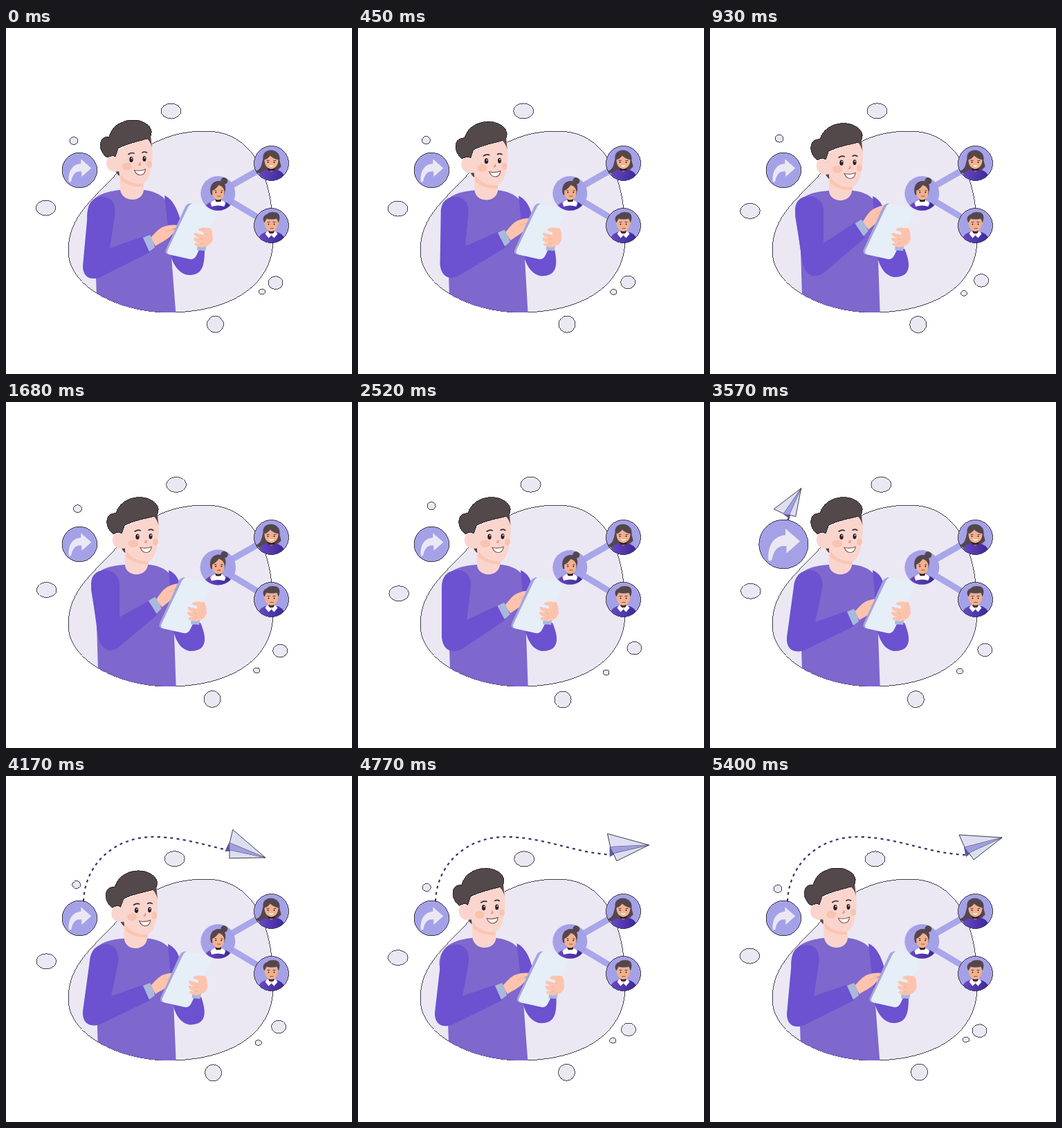
An HTML page for the animation above (5.46 s loop, 500x500 px).

```html
<!DOCTYPE html>
<html lang="en">
<head>
<meta charset="utf-8">
<title>Sharing with friends</title>
<style>
  html, body { margin: 0; width: 100%; height: 100%; overflow: hidden; background: #fff; }
  svg { display: block; width: 100vw; height: 100vh; }
  .edge { stroke: #17151d; stroke-width: .8; vector-effect: non-scaling-stroke; shape-rendering: crispEdges; }
  .pale { fill: #ebe8f4; }
  .disc { fill: #a5a1e7; }
  .sleeve { fill: #6c51d0; }
  .shirt { fill: #7e67cd; }
  .face { fill: #fad5cd; }
  .hand { fill: #fdc3ad; }
  .cuff { fill: #a9b9dc; }
  .hair { fill: #53484a; }
  .ink { fill: #2b2026; }
  .tan { fill: #f1b18f; }
  .brown { fill: #55464c; }
</style>
</head>
<body>
<svg viewBox="0 0 500 500">
  <defs>
    <path id="blob" d="M288 149 C354 149 387 208 386 305 C386 375 320 411 235 411 C165 411 90 375 90 322 C90 270 130 245 160 210 C195 170 235 149 288 149 Z"/>
    <clipPath id="body"><use href="#blob"/><path d="M60 100 H300 V325 H60 Z"/></clipPath>
    <clipPath id="round"><circle r="24.8"/></clipPath>
    <linearGradient id="coat"><stop stop-color="#6a49c4"/><stop offset="1" stop-color="#3b2796"/></linearGradient>
    <mask id="flown" maskUnits="userSpaceOnUse" x="0" y="0" width="500" height="300">
      <path id="reveal" fill="none" stroke="#fff" stroke-width="12"/>
    </mask>
  </defs>

  <use href="#blob" class="pale edge"/>
  <g id="bubbles" class="pale edge"></g>

  <g id="man">
    <g clip-path="url(#body)">
      <path id="torso" class="shirt"/>
      <path id="farArm" class="sleeve"/>
    </g>
    <path id="neck" class="face"/>
    <g id="head">
      <path class="hair" d="M156 200 L163 203 L164 214 Q158 210 156 200 Z"/>
      <path class="face" d="M158 178 L209 152 C212 170 213 188 210 202 C207 218 202 226 193 226 C180 226 168 219 163 207 C152 210 144 203 145 194 C146 186 152 183 158 187 Z"/>
      <path d="M165 211 C174 222 184 226 198 225 L198 229 C184 231 172 225 166 220 Z" fill="#fcc5ae"/>
      <path class="hair edge" d="M146 187 C137 181 134 170 138 162 C141 158 145 157 149 157 C153 142 167 133 184 133 C200 133 211 143 210 151 C210 157 207 160 204 160 C190 164 175 167 162 174 L158 186 C154 183 150 185 146 187 Z"/>
      <path d="M204 160 L209 156 L211 173 Q209 165 204 160 Z" class="hair"/>
      <ellipse cx="175" cy="200" rx="7" ry="5.6" fill="#f9c3ae"/>
      <ellipse cx="207" cy="197" rx="4" ry="5" fill="#f9c3ae"/>
      <ellipse cx="181" cy="190" rx="2.700" ry="4" class="ink"/>
      <ellipse cx="200" cy="189" rx="2.500" ry="3.900" class="ink"/>
      <circle cx="181.700" cy="188.500" r=".9" fill="#fff"/>
      <circle cx="200.500" cy="187.500" r=".9" fill="#fff"/>
      <path d="M177 182.500 Q181 179.500 185 181 M197 180 Q200 178 203.500 180" fill="none" stroke="#3a2d33" stroke-width="1.700" stroke-linecap="round"/>
      <path d="M193.500 195 Q195 197.500 192 198" fill="none" stroke="#e0937e" stroke-width="1.800" stroke-linecap="round"/>
      <path d="M185.500 205.500 Q194 207.500 201.500 204 Q201 212.500 193.500 212.500 Q188 212 185.500 205.500 Z" fill="#fff" stroke="#8a5a52" stroke-width="1.200"/>
    </g>
    <path id="nearArm" class="sleeve"/>
    <g id="nearHand">
      <path class="hand" d="M3 -9 C9 -15 14 -22 22 -25 C30 -28 38 -28 43 -27 C44 -24 40 -23 34 -21 L43 -22 C44 -18 38 -17 34 -14 C29 -7 21 -4 10 3 Z"/>
      <path d="M24 -17 Q31 -21 37 -20" fill="none" stroke="#f2a68f" stroke-width=".8"/>
      <path class="cuff" d="M-8 -9 L2 -13 Q7 -5 9 5 L1 11 Z"/>
    </g>
    <g id="phone">
      <path d="M267 253.500 L302 262 L268 334 L234 327 Q229 326 231 320 L259 258 Q262 253 267 253.500 Z" fill="#a5a5db"/>
      <path d="M272 254 L301 261 Q307 263 305 268 L275 329 Q272 335 266 334 L237 327.500 Q231 326 234 320 L263 259 Q266 253 272 254 Z" fill="#e6eef8"/>
      <path class="cuff" d="M277 313 L290 313 L288 322 L276 321 Z"/>
      <path class="hand" d="M278 291 C282 287 289 289 295 289 C299 292 298 300 299 305 C297 313 290 316 283 317 C278 316 273 315 272 312 C274 310 277 311 280 311 C275 310 271 307 271 304 C273 302 276 304 280 304 C275 302 270 299 272 296 C276 296 280 298 285 299 C287 296 285 294 279 293 Z"/>
      <path d="M280 304 L285 306 M280 311 L285 311" stroke="#f2a68f" stroke-width=".8"/>
    </g>
  </g>

  <path d="M383 195 L306 239 L383 285" fill="none" stroke="#a9a6e9" stroke-width="9"/>

  <g id="friend0">
    <circle r="25" class="disc"/>
    <g clip-path="url(#round)">
      <circle cx="9" cy="-18" r="5" class="brown"/>
      <path d="M-19 19 Q-14 13 -8 12 H8 Q15 13 19 19 V26 H-19 Z" fill="url(#coat)"/>
      <path d="M-11 14 Q-6 9 0 9 Q7 9 11 14 L9 19 Q0 16 -9 19 Z" fill="#fff"/>
      <path d="M-3 5 H4 V11 Q0 15 -3 11 Z" class="tan"/>
      <path d="M-4 8 Q0 11 5 8 L4 12 H-3 Z" class="ink"/>
      <path d="M-10 2 C-14 -12 -6 -18 1 -18 C9 -18 13 -11 10 -2 L9 2 Z" class="brown"/>
      <path d="M-8 -4 Q-2 -7 1 -12 Q7 -11 9 -4 C10 4 6 9 1 9 C-5 9 -9 4 -8 -4 Z" class="tan"/>
      <path d="M-5 -4 H-2 M4 -4 H7" stroke="#55464c"/>
      <circle cx="-3" cy="-1.500" r="1" class="ink"/><circle cx="5" cy="-1.500" r="1" class="ink"/>
      <path d="M-1 4 H4" stroke="#a6484a"/>
    </g>
  </g>

  <g id="friend1">
    <circle r="25" class="disc edge"/>
    <g clip-path="url(#round)">
      <path d="M-12 -7 C-13 -15 -7 -19 -1 -19 C7 -19 13 -13 12 -6 C12 -1 14 1 14 5 L10 9 L-11 14 Q-19 17 -22 11 C-15 9 -14 2 -12 -7 Z" class="brown"/>
      <path d="M-19 19 Q-16 11 -7 9 H7 Q16 11 19 19 V27 H-19 Z" fill="url(#coat)"/>
      <path d="M-4 4 H4 V10 Q0 14 -4 10 Z" class="tan"/>
      <path d="M-6 6 Q0 10 6 6 L4 11 H-4 Z" class="ink"/>
      <path d="M-10 -5 Q-4 -7 -2 -11 Q4 -6 10 -5 C10 3 5 8 0 8 C-6 8 -10 3 -10 -5 Z" class="tan"/>
      <path d="M-7 -4 H-3 M3 -4 H7" stroke="#55464c"/>
      <circle cx="-5" cy="-1.500" r="1" class="ink"/><circle cx="4" cy="-1.500" r="1" class="ink"/>
      <path d="M-4 3 H4 Q0 7 -4 3 Z" fill="#fff"/>
    </g>
  </g>

  <g id="friend2">
    <circle r="25" class="disc edge"/>
    <g clip-path="url(#round)">
      <path d="M-19 19 Q-16 11 -7 9 H7 Q16 11 19 19 V27 H-19 Z" fill="url(#coat)"/>
      <path d="M-6 8 L0 13 L6 8 L9 12 L4 18 L0 14 L-4 18 L-9 12 Z" fill="#fff"/>
      <path d="M-4 4 H4 V9 L0 13 L-4 9 Z" class="tan"/>
      <path d="M-4 7 Q0 10 4 7 L3 11 H-3 Z" class="ink"/>
      <path d="M-9 -9 H9 Q12 -4 9 0 C8 5 5 8 0 8 C-5 8 -8 5 -9 0 Q-12 -4 -9 -9 Z" class="tan"/>
      <path d="M-10 -4 C-14 -10 -11 -15 -7 -16 C-4 -20 2 -20 7 -19 C13 -17 13 -10 10 -4 L8 -10 Q0 -8 -7 -10 Z" class="brown"/>
      <path d="M-6 -5 H-2 M2 -5 H6" stroke="#55464c"/>
      <circle cx="-4" cy="-2" r="1" class="ink"/><circle cx="4" cy="-2" r="1" class="ink"/>
      <path d="M-2 4 H3" stroke="#a6484a"/>
    </g>
  </g>

  <g mask="url(#flown)">
    <path id="trail" d="M112 181 C114 125 160 86 218 88 C275 90 315 112 370 114" fill="none" stroke="#39326b" stroke-width="2.200" stroke-dasharray="4 5.3"/>
  </g>
  <g id="plane" stroke-linejoin="round">
    <path d="M-3 -11 L52 -25 L7 -3 L0 3 Z" fill="#9d98dd"/>
    <path d="M-3 -11 L8 -4 L0 3 Z" fill="#5f559f"/>
    <path class="edge" d="M-10 -29 L52 -25 L-2 -11 Z" fill="#dcdff2"/>
    <path class="edge" d="M4 -3 L52 -25 L11 7 Z" fill="#dcdff2"/>
    <path d="M-2 -11 L52 -25 L4 -3 Z" fill="#a29ee1"/>
  </g>

  <g id="share">
    <circle r="25.300" class="disc edge"/>
    <path class="pale" d="M-15.500 16.500 C-17 2 -10 -9 2 -9.500 V-16 L17 -3 L3 9.500 V2 C-6 1 -10 6 -12 16 Q-14 18 -15.500 16.500 Z"/>
  </g>
</svg>

<script>
const LOOP = 5460, STEP = 30;
const $ = id => document.getElementById(id);
const set = (id, name, value) => $(id).setAttribute(name, value);
const lerp = (a, b, k) => a + (b - a) * k;

// Blends the numbers of two strings that share one structure.
function mix(a, b, k) {
  const to = b.match(/-?[\d.]+/g);
  let i = 0;
  return a.replace(/-?[\d.]+/g, n => lerp(+n, +to[i++], k).toFixed(2));
}

// Smooth curve through [time, value] keys, without overshoot.
function track(t, keys) {
  const last = keys.length - 1;
  if (t <= keys[0][0]) return keys[0][1];
  if (t >= keys[last][0]) return keys[last][1];
  const i = keys.findIndex(key => key[0] > t) - 1;
  const slope = j => (keys[j + 1][1] - keys[j][1]) / (keys[j + 1][0] - keys[j][0]);
  const tangent = j => {
    if (j === 0 || j === last) return 0;
    const a = slope(j - 1), b = slope(j);
    return a * b <= 0 ? 0 : 2 * a * b / (a + b);
  };
  const [t0, v0] = keys[i], [t1, v1] = keys[i + 1];
  const span = t1 - t0, u = (t - t0) / span, w = 1 - u;
  return v0 * (1 + 2 * u) * w * w + v1 * u * u * (3 - 2 * u)
    + span * u * w * (tangent(i) * w - tangent(i + 1) * u);
}

// x, y, rx, ry, drift x, drift y
const bubbles = [
  [238.5, 120, 14.5, 11, 11.3, -.8],
  [98, 163, 6, 5.5, 8.2, -13],
  [57.5, 260, 14.3, 11, 1.7, 17],
  [389.5, 368.2, 10.5, 9.3, 10, -12.7],
  [370, 380.8, 4.5, 3.7, -11.6, 10.3],
  [302.5, 428, 12, 12, -6.5, 2]
].map(([cx, cy, rx, ry, dx, dy]) => {
  const el = document.createElementNS('http://www.w3.org/2000/svg', 'ellipse');
  Object.entries({ cx, cy, rx, ry }).forEach(([name, v]) => el.setAttribute(name, v));
  $('bubbles').append(el);
  return { el, dx, dy };
});

// Each part: upright pose, settled pose
const parts = {
  torso: [
    'M165 234 C138 237 118 245 117 272 L130 360 L132 420 L246 420 L239 330 L241 278 C240 250 224 237 199 234 Z',
    'M172 235 C144 237 123 244 123 272 L131 320 L134 420 L246 420 L243 335 L246 278 C246 250 230 237 206 235 Z'],
  farArm: [
    'M229 242 C241 247 249 264 253 282 L262 318 L287 321 C287 347 282 357 264 357 C252 356 243 345 239 332 Z',
    'M235 243 C246 248 252 258 253 275 L260 318 L281 319 C293 347 287 360 266 360 C254 358 247 348 243 335 Z'],
  neck: [
    'M163 205 L165 234 C168 252 196 253 199 235 L198 215 Z',
    'M171 207 L172 236 C174 253 202 254 205 236 L205 217 Z']
};

const armPoses = [
  'M118 268 C118 249 130 244 141 244 C156 246 159 258 157 272 L150 318 L197 302 L208 324 L136 360 C120 366 111 358 111 344 Z',
  'M123 264 C123 249 132 243 144 243 C158 244 164 254 164 264 L164 311 L210 281 L224 303 L164 354 C148 364 138 356 133 338 Z',
  'M123 264 C123 249 132 243 144 243 C158 244 164 254 164 264 L164 311 L207 287 L219 307 L162 355 C147 364 138 356 133 340 Z',
  'M121 266 C122 249 132 243 145 243 C160 244 164 256 163 268 L157 315 L202 294 L214 314 L150 357 C133 364 123 358 121 340 Z',
  'M121 267 C123 249 133 243 146 243 C160 245 164 258 162 270 L152 318 L198 302 L208 324 L136 359 C119 364 110 356 111 340 Z'
];
const wristPoses = [[206, 312, 0], [219, 290, -10], [215, 295, -8], [210, 303, -4], [206, 312, 0]]
  .map(([x, y, r]) => `translate(${x} ${y}) rotate(${r})`);

const lean = [[0, 0], [900, 1], [3900, 1], [4950, 0]];
const swipe = [[0, 0], [930, 1], [1680, 2], [2520, 3], [3570, 4], [4170, 4], [5400, 5]];
const flight = [[3450, 0], [3570, .045], [3720, .22], [4020, .737], [4170, .832], [4560, .96], [5130, 1]];
const turn = [[3450, -48], [3570, -41], [4020, 28], [4170, 37], [5130, 0]];
const growth = [[3450, .6], [3570, .8], [4100, 1]];

// id, x, y, start, length, extra scale
const pulses = [
  ['friend0', 306.3, 239, 1230, 520, .18],
  ['friend1', 383.5, 195.5, 1880, 500, .18],
  ['friend2', 383.5, 285.5, 2510, 500, .18],
  ['share', 106.3, 205.5, 3290, 560, .4]
];

const trail = $('trail');
const trailLength = trail.getTotalLength();
set('reveal', 'd', trail.getAttribute('d'));

function draw(t) {
  const drift = (1 - Math.cos(2 * Math.PI * t / LOOP)) / 2;
  for (const { el, dx, dy } of bubbles)
    el.setAttribute('transform', `translate(${dx * drift} ${dy * drift})`);

  const k = track(t, lean);
  for (const id in parts) set(id, 'd', mix(...parts[id], k));
  set('head', 'transform', `translate(${9 * k} ${4.5 * k}) rotate(${1.5 * k} 175 190)`);
  set('phone', 'transform', `translate(${-9 * k} 0)`);

  const at = track(t, swipe), from = Math.floor(at) % 5, to = (from + 1) % 5, part = at % 1;
  set('nearArm', 'd', mix(armPoses[from], armPoses[to], part));
  set('nearHand', 'transform', mix(wristPoses[from], wristPoses[to], part));

  for (const [id, x, y, start, length, extra] of pulses) {
    const u = Math.min(1, Math.max(0, (t - start) / length));
    set(id, 'transform', `translate(${x} ${y}) scale(${1 + extra * Math.sin(Math.PI * u) ** 2})`);
  }

  const flown = trailLength * track(t, flight), tail = trail.getPointAtLength(flown);
  const shown = t >= 3480 ? 'visible' : 'hidden';
  set('reveal', 'stroke-dasharray', `${flown} 9999`);
  set('trail', 'visibility', shown);
  set('plane', 'visibility', shown);
  set('plane', 'transform',
    `translate(${tail.x} ${tail.y}) rotate(${track(t, turn)}) scale(${track(t, growth)})`);
}

const begin = performance.now();
function tick() {
  const t = (performance.now() - begin) % LOOP;
  draw(Math.min(LOOP - 2 * STEP, Math.floor(t / STEP) * STEP));
  requestAnimationFrame(tick);
}
tick();
</script>
</body>
</html>
```
